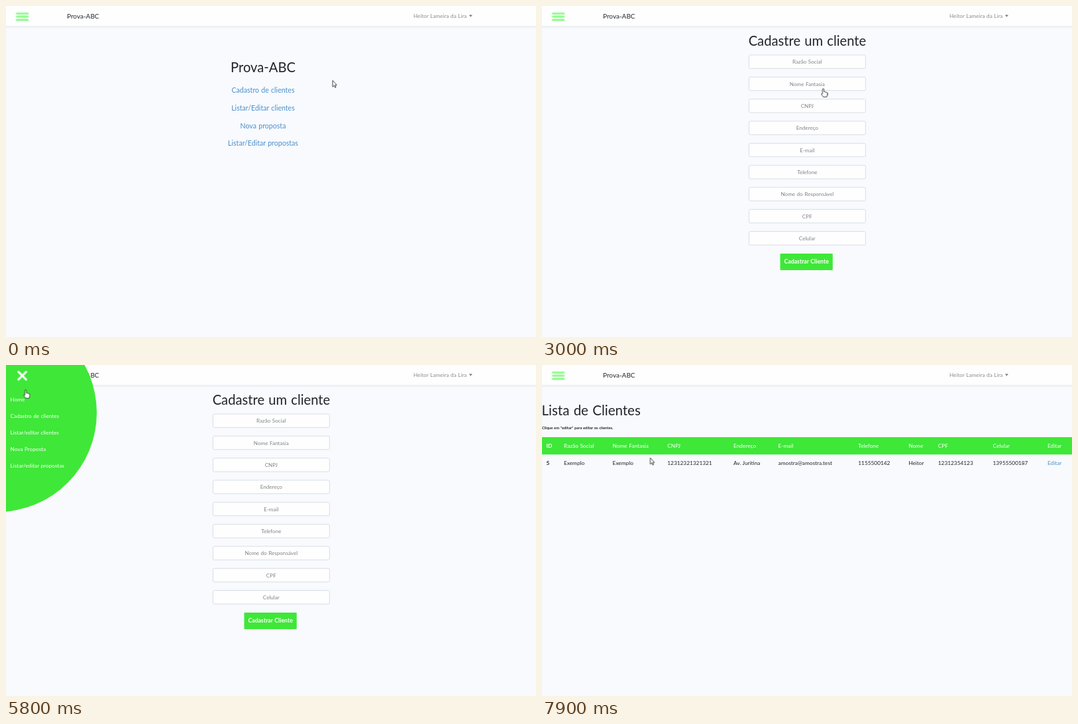
Recreate the animation shown at these times as an HTML page. Size 800x500 px, loop 8000 ms.

```html
<!DOCTYPE html>
<html lang="pt-BR">
<head>
<meta charset="utf-8">
<title>Cadastro</title>
<style>
html, body { margin: 0; height: 100%; overflow: hidden; background: #f8fafd; }
svg { display: block; width: 100vw; height: 100vh; }
text { font-family: Lato, "Open Sans", sans-serif; font-size: 8.2px; word-spacing: .05em; fill: #212529; }
.mid { text-anchor: middle; }
.bold text, text.bold { font-weight: 700; }
.brand { font-size: 10px; }
.user { font-size: 8.2px; fill: #8c8c8c; }
.title { font-size: 20.2px; }
.links text { font-size: 10.6px; }
.links text, text.link { fill: #4a8fcd; }
.fields rect { fill: #fffeff; stroke: #cfd6dd; stroke-width: .8; }
.fields text { font-size: 8.1px; fill: #7d8389; }
.green { fill: #3fe738; }
.white text, text.white { fill: #fff; }
.row text { font-size: 8.3px; }

/* Everything shares one 8 s clock. */
.home, .form, .list, .menu, .arrow, .hand { animation: 8s step-end infinite; }
.home { animation-name: home; }
.form { animation-name: form; }
.list { animation-name: list; }
.menu { animation-name: menu; }
.arrow { animation-name: arrow; }
.hand { animation-name: hand; }
@keyframes home { 0% { visibility: visible } 33.7% { visibility: hidden } }
@keyframes form { 0% { visibility: hidden } 33.7% { visibility: visible } 87.45% { visibility: hidden } }
@keyframes list { 0% { visibility: hidden } 87.45% { visibility: visible } }
@keyframes menu { 0% { visibility: hidden } 63.8% { visibility: visible } 87.45% { visibility: hidden } }
@keyframes arrow {
  0% { visibility: visible } 26% { visibility: hidden }
  42.4% { visibility: visible } 58.7% { visibility: hidden }
  94.6% { visibility: visible }
}
@keyframes hand {
  0% { visibility: hidden } 26% { visibility: visible }
  42.4% { visibility: hidden } 58.7% { visibility: visible }
  94.6% { visibility: hidden }
}

.blob { animation: grow 8s linear infinite; }
@keyframes grow {
  0%, 63.5% { cx: 140px; r: 0; animation-timing-function: ease }
  67.25%, 100% { cx: -13px; r: 150px }
}
.hover { stroke: #fff; stroke-width: 0; animation: hover 8s step-end infinite; }
@keyframes hover { 0% { stroke-width: 0 } 76.2% { stroke-width: .45px } 87.45% { stroke-width: 0 } }

.burger line { stroke: #8cfc88; stroke-width: 3.2; stroke-linecap: round; animation: 8s linear infinite; }
.burger .top { animation-name: top; }
.burger .center { animation-name: center; }
.burger .bottom { animation-name: bottom; }
@keyframes top {
  0%, 63.8%, 87.46%, 100% { transform: translateY(-4.8px) rotate(0deg); stroke: #8cfc88; animation-timing-function: ease-out }
  67.25%, 87.45% { transform: translateY(0) rotate(45deg); stroke: #fff; animation-timing-function: linear }
}
@keyframes center {
  0%, 63.5%, 87.46%, 100% { opacity: 1; animation-timing-function: ease }
  67.25%, 87.45% { opacity: 0; animation-timing-function: linear }
}
@keyframes bottom {
  0%, 63.8%, 87.46%, 100% { transform: translateY(4.8px) rotate(0deg); stroke: #8cfc88; animation-timing-function: ease-out }
  67.25%, 87.45% { transform: translateY(0) rotate(-45deg); stroke: #fff; animation-timing-function: linear }
}

.cursor { animation: point 8s linear infinite; }
.cursor path { fill: #fff; stroke: #222; stroke-width: .85; stroke-linejoin: round; }
@keyframes point {
  0%, 18.7% { transform: translate(493px, 112.4px) }
  18.72%, 21.5% { transform: translate(492.6px, 113px) }
  24% { transform: translate(462px, 150px) }
  27%, 28.5% { transform: translate(424px, 199px) }
  32%, 42% { transform: translate(424.5px, 125px); animation-timing-function: ease-in-out }
  52.5% { transform: translate(53px, 47px) }
  56.25% { transform: translate(35.8px, 37.4px) }
  58.75% { transform: translate(31px, 28px) }
  62.5%, 70% { transform: translate(29px, 21.5px); animation-timing-function: ease-in-out }
  78%, 94% { transform: translate(31.8px, 100.5px); animation-timing-function: ease-in-out }
  98.7%, 100% { transform: translate(163.4px, 140.2px) }
}
</style>
</head>
<body>
<svg viewBox="0 0 800 500" preserveAspectRatio="none">
  <defs>
    <linearGradient id="shade" x2="0" y2="1">
      <stop stop-opacity=".07"/>
      <stop offset="1" stop-opacity="0"/>
    </linearGradient>
  </defs>
  <rect width="800" height="500" fill="#f8fafd"/>
  <rect y="30" width="800" height="4" fill="url(#shade)"/>
  <rect width="800" height="30.3" fill="#fffeff"/>
  <text class="brand" x="92" y="19">Prova-ABC</text>
  <text class="user" x="615" y="18">Heitor Lameira da Lira</text>
  <path d="M698.8 13.6h5.2l-2.6 2.8z" fill="#777"/>

  <g class="home mid">
    <text class="title" x="388" y="100">Prova-ABC</text>
    <g class="links">
      <text x="388" y="131.3">Cadastro de clientes</text>
      <text x="388" y="157.9">Listar/Editar clientes</text>
      <text x="388" y="184.5">Nova proposta</text>
      <text x="388" y="210.9">Listar/Editar propostas</text>
    </g>
  </g>

  <g class="form mid">
    <text class="title" x="400.4" y="59.6">Cadastre um cliente</text>
    <g class="fields" id="fields"></g>
    <rect class="green" x="359.5" y="374" width="79.3" height="25" rx="1"/>
    <text class="white bold" x="399.2" y="389.2" style="font-size:8.7px">Cadastrar Cliente</text>
  </g>

  <g class="list">
    <text class="title" x="-.5" y="75.8" style="font-size:20.5px">Lista de Clientes</text>
    <text class="bold" x="0" y="97" style="font-size:5.8px">Clique em "editar" para editar os clientes.</text>
    <rect class="green" y="109" width="800" height="26.2"/>
    <g class="row white" id="head"></g>
    <g class="row" id="client"></g>
  </g>

  <g class="menu white">
    <circle class="blob green" cy="72"/>
    <text x="6.6" y="55">Home</text>
    <text x="6.6" y="80">Cadastro de clientes</text>
    <text class="hover" x="6.6" y="105">Listar/editar clientes</text>
    <text x="6.6" y="130">Nova Proposta</text>
    <text x="6.6" y="155">Listar/editar propostas</text>
  </g>

  <g class="burger" transform="translate(24.6 16.2)">
    <line class="top" x1="-8.2" x2="8.2"/>
    <line class="center" x1="-8.2" x2="8.2"/>
    <line class="bottom" x1="-8.2" x2="8.2"/>
  </g>

  <g class="cursor">
    <path class="arrow" d="M0 0V9.6L2.2 7.6 3.7 10.8 5.1 10.1 3.7 7H6.4Z"/>
    <path class="hand" d="M-1.1 1a1.1 1.1 0 0 1 2.2 0V4.6Q2.8 3.9 3.2 5.2 4.7 4.5 5 5.8 6.3 5.5 6.3 6.9V9L5.2 12.4H0L-2.8 8.3Q-3.2 6.7-1.1 7.7Z"/>
  </g>
</svg>
<script>
const SVG = 'http://www.w3.org/2000/svg';

function add(parent, tag, attrs, content = '') {
  const node = document.createElementNS(SVG, tag);
  for (const key in attrs) node.setAttribute(key, attrs[key]);
  node.textContent = content;
  document.getElementById(parent).append(node);
}

const labels = ['Razão Social', 'Nome Fantasia', 'CNPJ', 'Endereço', 'E-mail',
  'Telefone', 'Nome do Responsável', 'CPF', 'Celular'];
labels.forEach((label, i) => {
  const y = 74 + i * 33.33;
  add('fields', 'rect', { x: 312.4, y, width: 176, height: 20.4, rx: 2 });
  add('fields', 'text', { x: 400.3, y: y + 13.3 }, label);
});

// Column position, heading and value.
const columns = [
  [6.6, 'ID', '5'],
  [33, 'Razão Social', 'Exemplo'],
  [106.6, 'Nome Fantasia', 'Exemplo'],
  [189.3, 'CNPJ', '12312321321321'],
  [289, 'Endereço', 'Av. Juritina'],
  [356.6, 'E-mail', 'amostra@amostra.test'],
  [477.3, 'Telefone', '1155500142'],
  [553.2, 'Nome', 'Heitor'],
  [597.8, 'CPF', '12312354123'],
  [680.5, 'Celular', '13955500187'],
  [763, 'Editar', 'Editar']
];
columns.forEach(([x, heading, value], i) => {
  const weight = i ? '' : 'bold';
  add('head', 'text', { x, y: 124.6, class: weight }, heading);
  add('client', 'text', { x, y: 151.2, class: i === 10 ? 'link' : weight }, value);
});
</script>
</body>
</html>
```
